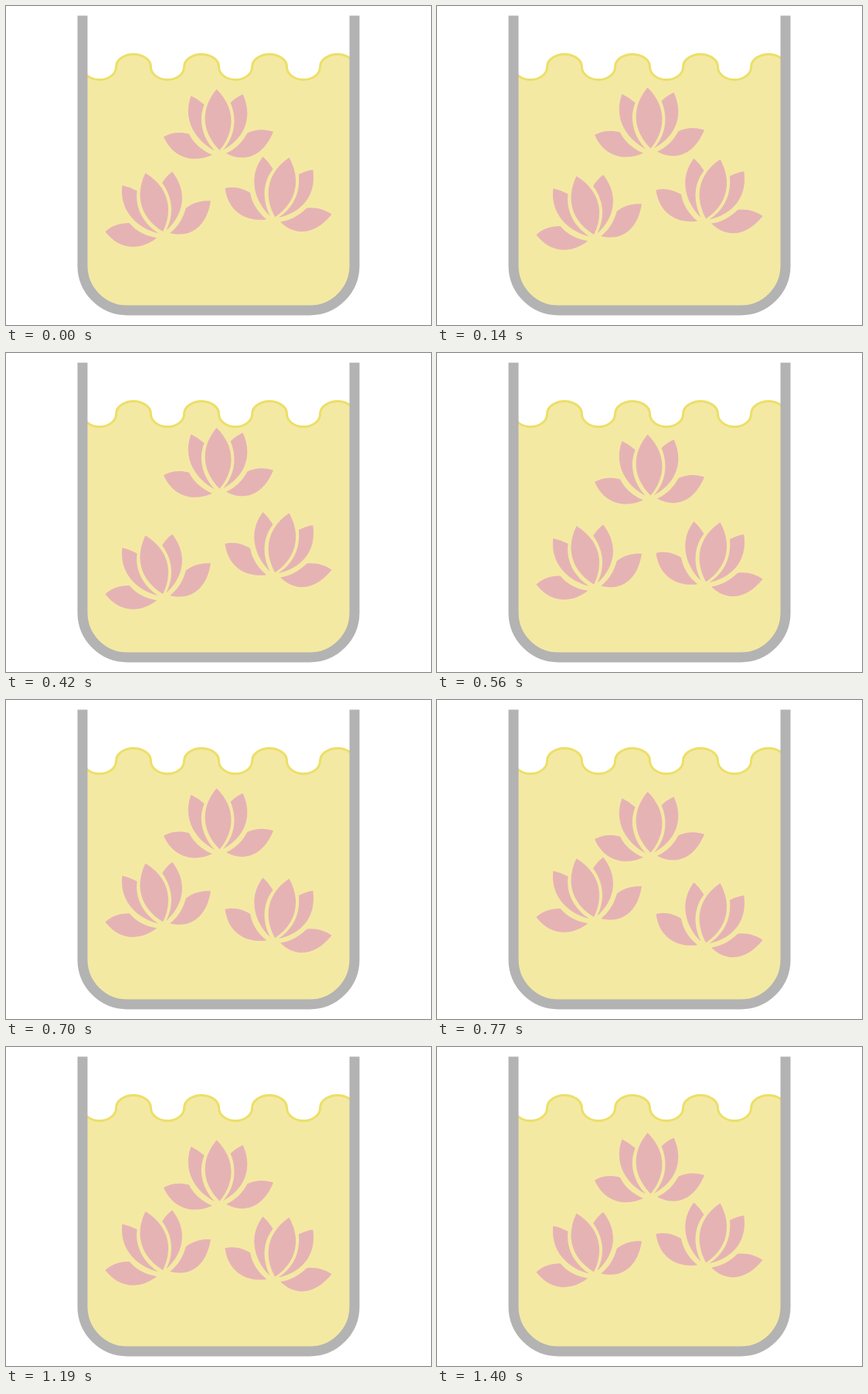
Write an HTML page that moves like this. It is 550 by 413 pixels and loops after 1.47 s.

```html
<!DOCTYPE html>
<html lang="en">
<head>
<meta charset="utf-8">
<title>Floating lotus flowers</title>
<style>
  html, body { margin: 0; width: 100%; height: 100%; overflow: hidden; background: #fff; }
  svg { display: block; width: 100%; height: 100%; }
</style>
</head>
<body>
<svg viewBox="0 0 550 413">
  <defs>
    <g id="lotus" fill="#e6b3b5">
      <path d="M-3.5-82.5C-24-58-24-28 .5-3.5C21-28 21-58-3.5-82.5Z"/>
      <path d="M-36.5-74Q-27-69.5-19.5-62.5C-28-41-21-19-6-3C-28-14-49-41-36.5-74Z"/>
      <path d="M30.5-76Q21.5-72 14.5-65C24-42 19-20 5-4C28-16 46-42 30.5-76Z"/>
      <path d="M-72-21C-62-27-50-27.5-39-24.5C-33-12-22-3-9 2.5C-35 14-60 6-72-21Z"/>
      <path d="M70-27.5C59-31 48-31 36.5-26C30-14 21-5 9 .5C33 13.5 57 4 70-27.5Z"/>
    </g>
  </defs>
  <path id="liquid" fill="#f4e9a3"/>
  <path id="surface" fill="none" stroke="#ecdf67" stroke-width="3"/>
  <path d="M99 12.5V336a58 58 0 0 0 58 58H393a58 58 0 0 0 58-58V12.5" fill="none" stroke="#b3b3b3" stroke-width="13"/>
  <use href="#lotus" class="flower"/>
  <use href="#lotus" class="flower"/>
  <use href="#lotus" class="flower"/>
</svg>
<script>
const STEP = 70, FRAMES = 21, KEY_SPAN = 5;

const wave = 'M99.5 79' + 'a21.5 16.5 0 0 0 43 0a22.5 16.5 0 0 1 45 0'.repeat(4);
document.getElementById('surface').setAttribute('d', wave);
document.getElementById('liquid').setAttribute('d',
  wave + 'H451V336a58 58 0 0 1-58 58H157a58 58 0 0 1-58-58Z');

// Vertical offsets at evenly spaced keys, joined linearly
const flowers = [
  { x: 276, y: 190.2, angle: 0, keys: [0, -11, 11, 16, 0] },
  { x: 203.4, y: 295.6, angle: -13.7, keys: [0, 20, -11, -4, 0] },
  { x: 346.6, y: 276.4, angle: 16.35, keys: [0, 11, 41, 30.5, 0] }
];
const nodes = document.querySelectorAll('.flower');

function offsetAt(keys, step) {
  const i = Math.floor(step / KEY_SPAN);
  return keys[i] + (keys[i + 1] - keys[i]) * (step % KEY_SPAN) / KEY_SPAN;
}

function draw(now) {
  // The first pose is held for two ticks
  const step = Math.max(0, Math.floor(now / STEP) % FRAMES - 1);
  flowers.forEach(({ x, y, angle, keys }, i) => {
    nodes[i].setAttribute('transform',
      `translate(${x} ${y + offsetAt(keys, step)}) rotate(${angle})`);
  });
}

const start = performance.now();
function tick() {
  draw(performance.now() - start);
  requestAnimationFrame(tick);
}
tick();
</script>
</body>
</html>
```
